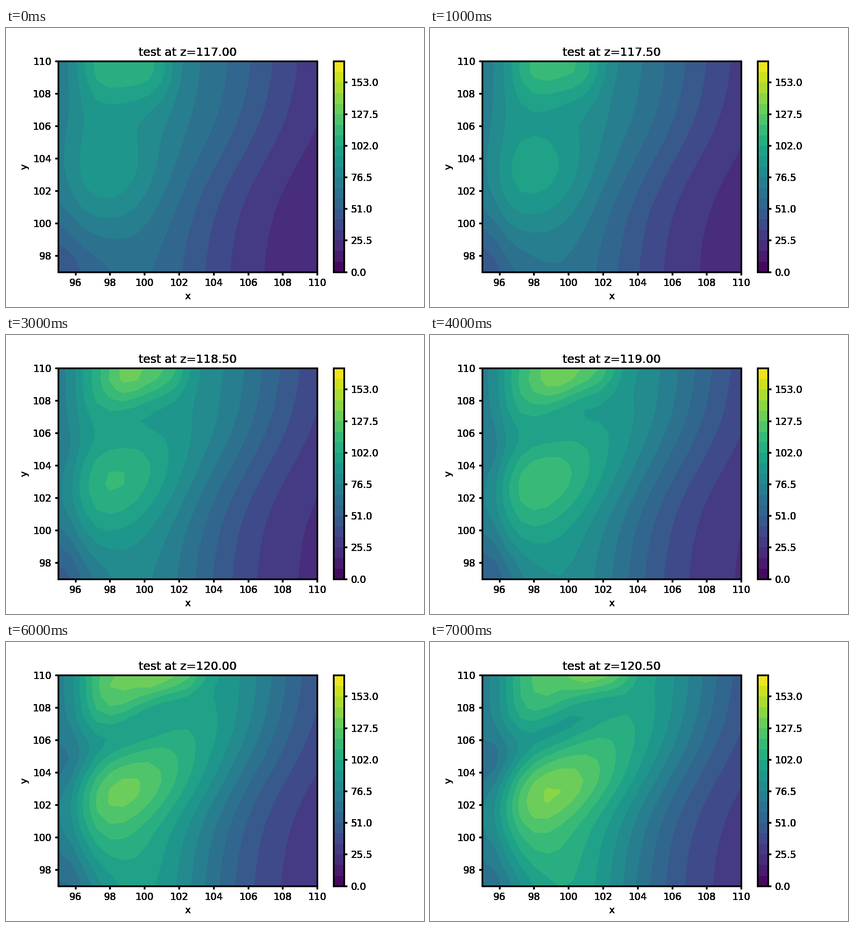
A matplotlib script for the animation above (8 s loop, 917 px wide and 611 px high).

```python
import matplotlib.pyplot as plt
import numpy as np
from matplotlib.animation import FuncAnimation

W, H, DPI = 917, 611, 152.8
FRAMES, STEP_MS = 8, 1000
Z_START, Z_STEP = 117, 0.5
LEVELS = np.linspace(0, 170, 21)
MAIN = [0.125, 0.125, 0.62, 0.755]
BAR = [0.78375, 0.125, 0.755 * H / W / 20, 0.755]
LAYERS = 12  # repeated drawing hardens the edges of text and lines

plt.rcParams.update({"axes.linewidth": 1.1, "xtick.major.width": 1.1,
                     "ytick.major.width": 1.1})

xs = np.linspace(95, 110, 21)
ys = np.linspace(97, 110, 21)
X, Y = np.meshgrid(xs, ys)


def bump(center, size, tilt=0, power=2):
    """Unit hill; tilt slopes its axis, a higher power flattens its top in x."""
    dx = X - center[0]
    dy = Y - center[1] - tilt * dx
    return np.exp(-0.5 * np.abs(dx / size[0])**power - 0.5 * (dy / size[1])**2)


def field(s):
    """Scalar field for s running from 0 (first slice) to 1 (last slice)."""
    def mix(a, b):
        return a + (b - a) * s

    # Falling front on the right, its foot bent along y.
    front = 106.7 + 2.1 * np.tanh((Y - 103.8) / 4) + mix(-2.2, -1.55)
    f = mix(16, 24) + mix(66, 104) / (1 + np.exp((X - front) / mix(2.45, 2.3)))

    # Drop along the left edge and in the lower left corner.
    f -= mix(10, 55) * np.exp(-0.5 * ((X - 95) / mix(0.75, 1.4))**2)
    f -= mix(28, 22) * bump((mix(95, 97.3), 96.5), (mix(2.6, 1.6),) * 2)

    # Growing hill in the lower half.
    f += mix(15, 19) * bump((mix(98.2, 99), mix(103.2, 102.6)),
                            (mix(1.9, 2.6), mix(2.3, 1.3)), mix(0, 0.35))

    # Hill at the top edge drifting right, with a second one that comes and goes.
    f += mix(30, 18) * bump((mix(99, 101.8), mix(109.8, 110)),
                            (mix(2.2, 1.43), mix(1.75, 0.7)), power=4)
    f += 18 * 6.75 * s**2 * (1 - s) * bump((98.4, 109.3), (1.3, 1.4))

    # Trough opening between the hills.
    f -= 32 * s**1.6 * bump((99.3, 106.75), (2.8, 1.15), 0.5)
    return f


def style_main(ax):
    ax.set(xlim=(95, 110), ylim=(97, 110), xlabel="x", ylabel="y",
           xticks=range(96, 111, 2), yticks=range(98, 111, 2))


def style_bar(ax):
    ticks = LEVELS[::3]
    ax.yaxis.tick_right()
    ax.set(ylim=(0, 170), xticks=[], yticks=ticks,
           yticklabels=[f"{v:.1f}" for v in ticks])


def add_layer(k, name, box, style):
    ax = fig.add_axes(box, label=f"{name}{k}")
    ax.patch.set_visible(False)
    style(ax)
    return ax


fig = plt.figure(figsize=((W + 1e-6) / DPI, (H + 1e-6) / DPI), dpi=DPI,
                 facecolor="white")
plot = fig.add_axes(MAIN)
style_main(plot)
cax = fig.add_axes(BAR)
layers = [add_layer(k, "main", MAIN, style_main) for k in range(LAYERS)]
for k in range(LAYERS):
    add_layer(k, "bar", BAR, style_bar)


def draw(n):
    for c in list(plot.collections):
        c.remove()
    title = f"test at z={Z_START + n * Z_STEP:.2f}"
    for ax in layers:
        ax.set_title(title)
    return plot.contourf(xs, ys, field(n / (FRAMES - 1)), levels=LEVELS,
                         cmap="viridis")


fig.colorbar(draw(0), cax=cax)


def update(n):
    draw(n)
    return []


anim = FuncAnimation(fig, update, frames=FRAMES, interval=STEP_MS,
                     repeat=True, repeat_delay=0, blit=False)
plt.show()
```
